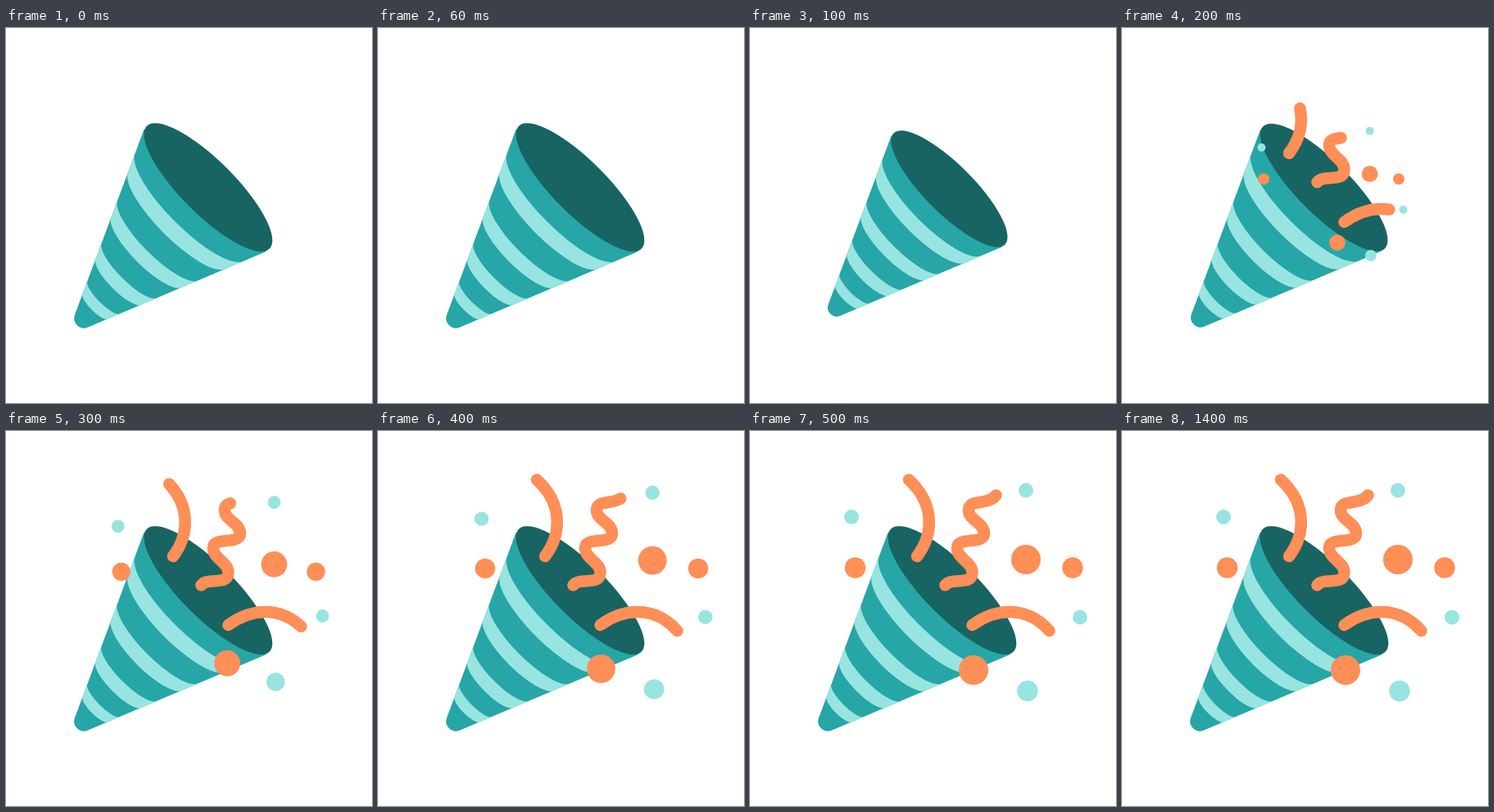
An HTML page that plays this animation: 447 by 458 pixels, repeating every 2000 ms.

```html
<!DOCTYPE html>
<html lang="en">
<head>
<meta charset="utf-8">
<title>Party popper</title>
<style>
  html, body { margin: 0; width: 100%; height: 100%; overflow: hidden; background: #fff; }
  svg { display: block; }
  #streamers { fill: none; stroke: #ff8e57; stroke-width: 14.5; stroke-linecap: round; }
</style>
</head>
<body>
<svg width="447" height="458" viewBox="0 0 447 458">
  <g id="popper">
    <path fill="#26a6a6" d="M168.8 123.3 L84 350.3 A12.1 12.1 0 0 0 100.1 365.6 L318.2 272.7Z"/>
    <path id="stripes" fill="#98e4e1"/>
    <ellipse rx="106" ry="32.7" transform="translate(246.9 194.6) rotate(45)" fill="#186462"/>
  </g>
  <g id="streamers">
    <path pathLength="1" d="M204 153 C226 124 224 87 194 59.5"/>
    <path pathLength="1" d="M238.5 188.3 C246 178 271.5 190 271.5 172.5 C271.5 160 253 156 253 143 C253 128 286 140 286 125 C286 112 267 109 267 97 C267 82 290 92 300.5 78.5"/>
    <path pathLength="1" d="M271.5 237 C300 216 338 213 365.5 244"/>
  </g>
  <g id="confetti"></g>
</svg>
<script>
const LOOP = 2000, STEP = 100;
const ORANGE = '#ff8e57', AQUA = '#98e4e1';
const $ = id => document.getElementById(id);

// Each stripe lies between two cross-sections of the cone, given as scales of the mouth.
const apex = [74, 377], mouthLeft = [168.8, 123.3], mouthRight = [318.2, 272.7];
const along = (end, s) => apex.map((a, i) => a + s * (end[i] - a)).join(' ');
const arc = (s, sweep, end) => `A${106.5 * s} ${31 * s} 45 0 ${sweep} ${along(end, s)}`;
const stripe = ([far, near]) =>
  `M${along(mouthLeft, far)} ${arc(far, 0, mouthRight)} L${along(mouthRight, near)} ${arc(near, 1, mouthLeft)}Z`;
$('stripes').setAttribute('d',
  [[.88, .79], [.655, .573], [.45, .372], [.267, .205]].map(stripe).join(''));

// Resting place and radius of every dot; all of them burst from one centre.
const burst = [246.3, 213];
const dots = [
  [124, 105, 9, AQUA], [128.5, 167, 12.7, ORANGE],
  [337, 72.5, 9, AQUA], [337, 157, 18, ORANGE],
  [394, 167, 12.7, ORANGE], [403, 227.5, 9, AQUA],
  [339, 317.5, 12.7, AQUA], [273, 292, 18, ORANGE]
].map(([x, y, r, fill]) => {
  const node = document.createElementNS('http://www.w3.org/2000/svg', 'circle');
  node.setAttribute('fill', fill);
  $('confetti').append(node);
  return { x, y, r, node };
});
const streamers = [...$('streamers').children];

// One value per step; the last one holds until the loop restarts.
const popperScale = [1, .907, .993, 1, 1, 1];
const spread = [0, 0, .621, .895, .98, 1];
const dotSize = [0, 0, .55, .88, .967, 1];
const arcDrawn = [0, 0, .56, .93, 1, 1];
const waveDrawn = [0, 0, .49, .85, .97, 1];

function draw(time) {
  const step = Math.min(5, Math.floor(time % LOOP / STEP));
  const visible = step > 1 ? 'visible' : 'hidden';
  const scale = `translate(209 214) scale(${popperScale[step]}) translate(-209 -214)`;

  $('popper').setAttribute('transform', scale);
  for (const id of ['streamers', 'confetti']) $(id).setAttribute('visibility', visible);

  streamers.forEach((path, i) => {
    const drawn = (i === 1 ? waveDrawn : arcDrawn)[step];
    path.setAttribute('stroke-dasharray', `${drawn} 2`);
  });
  for (const { x, y, r, node } of dots) {
    node.setAttribute('cx', burst[0] + (x - burst[0]) * spread[step]);
    node.setAttribute('cy', burst[1] + (y - burst[1]) * spread[step]);
    node.setAttribute('r', r * dotSize[step]);
  }
}

function tick() {
  draw(performance.now());
  requestAnimationFrame(tick);
}
tick();
</script>
</body>
</html>
```
